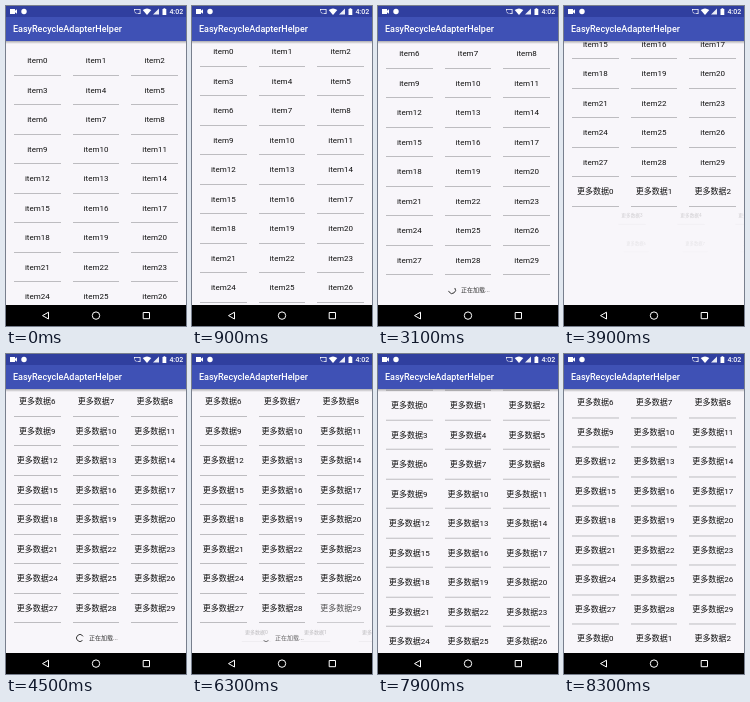
Animation of 180 by 320 pixels, one loop 8400 ms. Source, as an HTML page:

```html
<!DOCTYPE html>
<html lang="en">
<head>
<meta charset="utf-8">
<title>List loading more items</title>
<style>
html, body { margin: 0; width: 100%; height: 100%; overflow: hidden; background: #f8f6fa; }
#stage {
  position: relative; width: 180px; height: 320px; overflow: hidden; background: #f8f6fa;
  font-family: Roboto, "Noto Sans CJK SC", "Noto Sans CJK JP", sans-serif;
}
#list { position: absolute; top: 35px; left: 0; width: 180px; height: 264px; overflow: hidden; }
#content { position: absolute; top: -35px; left: 0; width: 180px; }
.cell {
  position: absolute; width: 58.67px; height: 29.5px; transform-origin: 0 0;
  font-size: 8px; line-height: 29.5px; text-align: center; white-space: nowrap; color: #111;
}
.cell::after {
  content: ""; position: absolute; left: 6px; right: 6px; bottom: 0; height: 1px; background: #bdbcc0;
}
#footer { position: absolute; left: 0; width: 180px; height: 29.5px; }
#footer svg { position: absolute; left: 69px; top: 9.5px; }
#footer span { position: absolute; left: 83px; font-size: 6px; line-height: 29.5px; white-space: nowrap; color: #333; }
#chrome { position: absolute; left: 0; top: 0; }
</style>
</head>
<body>
<div id="stage">
  <div id="list">
    <div id="content">
      <div id="footer">
        <svg width="10" height="10" viewBox="-5 -5 10 10">
          <circle id="ring" r="3.5" pathLength="1" fill="none" stroke="#333" stroke-width=".9"/>
        </svg>
        <span>正在加载...</span>
      </div>
    </div>
  </div>
  <svg id="chrome" width="180" height="320" viewBox="0 0 180 320">
    <defs>
      <linearGradient id="shade" x2="0" y2="1">
        <stop stop-color="#000" stop-opacity=".3"/>
        <stop offset="1" stop-color="#000" stop-opacity="0"/>
      </linearGradient>
    </defs>
    <rect y="35" width="180" height="3" fill="url(#shade)"/>
    <rect width="180" height="35" fill="#3f51b5"/>
    <rect width="180" height="11" fill="#303f9f"/>
    <text x="7" y="26.3" font-size="9" font-weight="500" fill="#fff">EasyRecycleAdapterHelper</text>

    <g fill="#fff">
      <path d="M4 3h5v1.8l2-1.6v4.6l-2-1.6V8H4z"/>
      <circle cx="18" cy="5.5" r="2.7"/>
      <path d="M128 3h6.5v5h-3v-.8h2.2V3.8h-4.9v1H128zM128 5.5a2.6 2.6 0 0 1 2.6 2.5H130a2 2 0 0 0-2-1.9z"/>
      <path d="M136.7 4q4.3-3 8.6 0L141 9z"/>
      <path d="M153 2.5V8.5H147z" opacity=".9"/>
      <path d="M156.5 3h1v-.8h1.8V3h1v6h-3.8z"/>
      <text x="163.4" y="8" font-size="7" font-weight="500">4:02</text>
    </g>

    <rect y="299" width="180" height="21" fill="#000"/>
    <g fill="none" stroke="#fff" stroke-width="1" stroke-linejoin="round">
      <path d="M42.5 306.2v6.8l-6-3.4z"/>
      <circle cx="90" cy="309.6" r="3.7"/>
      <rect x="137.2" y="306.5" width="6.3" height="6.2"/>
    </g>
  </svg>
</div>
<script>
const LOOP = 8400, STEP = 100, ENTER = 300;
const ROW = 29.5, TOP = 40.25, COL = 58.67, LEFT = 2;
const LOADS = [3225, 6225];
const PAGE_END = [66, 361];

// [time, scroll offset]
const SCROLL = [
  [800, 0], [900, 9], [1000, 30], [1100, 50], [1200, 62], [1300, 66],
  [3800, 66], [3900, 164], [4000, 255], [4100, 312], [4200, 343], [4300, 357], [4400, 361],
  [6500, 361], [6600, 346], [6700, 296], [6800, 234], [6900, 166.5], [7000, 72], [7100, 0], [7500, 0]
];

const content = document.getElementById("content");
const footer = document.getElementById("footer");
const ring = document.getElementById("ring");
const clamp = v => Math.max(0, Math.min(1, v));
const rowTop = row => TOP + row * ROW;

function enterTime(row) {
  if (row < 9) return -ENTER;
  if (row === 9) return 920;
  if (row === 10) return LOADS[0];
  if (row < 20) return 3850 + (row - 11) * 28;
  return LOADS[1];
}

const cells = Array.from({ length: 63 }, (_, i) => {
  const row = Math.floor(i / 3), col = i % 3;
  const el = document.createElement("div");
  el.className = "cell";
  el.textContent = i < 30 ? "item" + i : "更多数据" + i % 30;
  el.style.left = LEFT + col * COL + "px";
  el.style.top = rowTop(row) + "px";
  content.append(el);
  return { el, start: enterTime(row), load: LOADS[[29, 59].indexOf(i)] };
});

function scrollAt(t) {
  if (t >= 7500) return 360 * (1 - (1 - (t - 7500) / 900) ** 3);
  const next = SCROLL.findIndex(([time]) => time > t);
  if (next <= 0) return 0;
  const [t0, y0] = SCROLL[next - 1], [t1, y1] = SCROLL[next];
  return y0 + (y1 - y0) * (t - t0) / (t1 - t0);
}

function drawCell({ el, start, load }, t) {
  const p = clamp((t - start) / ENTER);
  // The last cell of a page cross-fades when the next page arrives.
  const dip = load ? .4 * Math.sin(Math.PI * clamp((t - load) / ENTER)) : 0;
  el.style.opacity = p - dip;
  el.style.transform = p < 1 ? `translateX(${COL * (1 - p)}px) scale(${.5 + .5 * p})` : "none";
}

function drawFooter(t) {
  const page = t < 3600 ? 0 : 1;
  const age = t - [1000, 4000][page];
  footer.style.top = rowTop(page ? 20 : 10) + "px";
  footer.style.opacity = age < 0 ? 0 : 1 - clamp((t - LOADS[page]) / ENTER);
  const sweep = .45 + .35 * Math.cos(2 * Math.PI * (age - 500) / 1333);
  ring.setAttribute("stroke-dasharray", `${sweep} 1`);
  ring.setAttribute("transform", `rotate(${45 + (age - 500) * .4})`);
}

function draw(now) {
  const t = Math.floor((now % LOOP) / STEP) * STEP;
  content.style.transform = `translateY(${-scrollAt(t)}px)`;
  cells.forEach(cell => drawCell(cell, t));
  drawFooter(t);
}

const began = performance.now();
function tick() {
  draw(performance.now() - began);
  requestAnimationFrame(tick);
}
tick();
</script>
</body>
</html>
```
